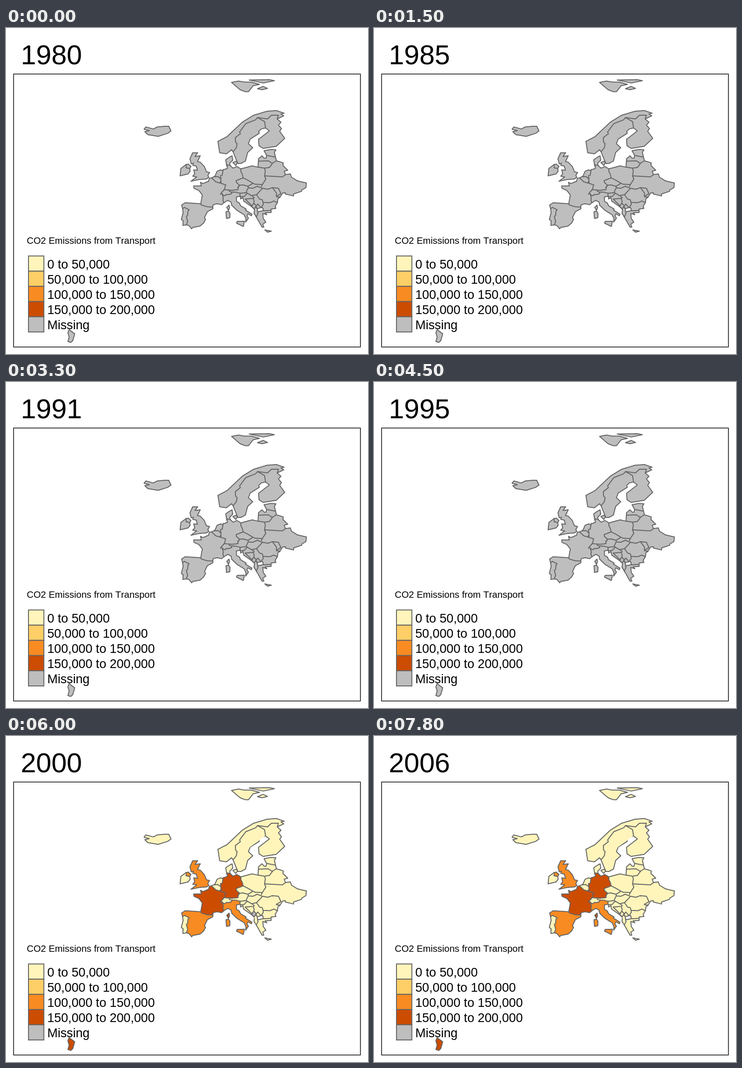
These frames come from a looping animation (789 px wide and 710 px high, 8 s). An HTML page:

```html
<!DOCTYPE html>
<html lang="en">
<head>
<meta charset="utf-8">
<title>CO2 Emissions from Transport</title>
<style>
html, body { margin: 0; width: 100%; height: 100%; overflow: hidden; background: #fff; }
svg { display: block; width: 100%; height: 100%; font-family: "Liberation Sans", Arial, sans-serif; font-kerning: none; }
#map * { fill: #bebebe; stroke: #636363; stroke-width: 2; stroke-linejoin: round; vector-effect: non-scaling-stroke; }
#map.data * { fill: #fff5bb; }
#map.data .high { fill: #f88b22; }
#map.data .top { fill: #cc4c02; }
#map.data .late { fill: #bebebe; }
#map.full .late { fill: #fff5bb; }
#map .hole { fill: #fff; }
#map polyline { fill: none; }
#key rect { stroke: #636363; stroke-width: 2; }
#key text { font-size: 27.2px; }
</style>
</head>
<body>
<svg viewBox="0 0 789 710">
<text id="year" x="32.2" y="79" font-size="60">1980</text>
<!-- longitude and latitude in tenths of a degree; later shapes cover shared borders -->
<g id="map" transform="matrix(.5496 0 0 -.73 434.4 699.5)">
<!-- eastern block, Low Countries, Jutland, southern block -->
<polygon points="130 530 141 538 186 547 209 543 211 568 225 577 233 570 241 570 243 578 233 592 259 596 280 595 274 587 282 562 309 556 308 548 327 534 313 531 318 521 337 523 342 513 366 502 401 496 399 482 383 475 382 471 350 463 350 457 317 463 317 467 307 466 296 453 240 460 140 475 125 480 115 500"/>
<polygon points="25 511 38 516 47 531 61 535 80 530 80 490 40 490"/>
<polygon points="99 546 85 546 81 565 94 572 106 577 109 564 97 555"/>
<polygon points="296 453 282 455 282 466 266 482 248 477 227 480 206 486 188 480 170 481 170 486 149 490 136 489 130 482 80 482 55 475 55 462 85 455 130 462 139 456 140 448 149 452 152 442 184 425 195 417 193 406 211 383 225 364 232 364 228 373 240 379 230 390 229 397 228 405 244 401 237 407 261 408 261 418 280 420 277 426 286 437 288 449"/>
<!-- France, Germany, Italy, Spain, Portugal -->
<polygon class="top" points="25 511 42 499 62 495 83 492 79 476 75 476 60 463 68 463 75 453 75 440 74 437 65 431 46 434 31 431 30 425 5 420 -19 430 -12 460 -25 473 -45 480 -46 487 -16 487 -19 498 -10 494 13 501 16 510"/>
<polygon class="top" points="85 550 99 548 110 540 125 545 141 538 141 530 147 521 150 511 122 503 124 497 136 489 129 483 130 476 105 474 75 476 81 490 62 495 62 508 60 518 67 519 71 536 79 537 88 540"/>
<polygon class="high" points="124 468 138 465 137 456 123 454 124 441 135 436 140 428 162 418 159 415 185 403 183 398 169 404 165 398 171 391 160 379 161 390 154 401 126 414 105 429 102 439 89 444 74 437 70 443 71 453 68 460 78 458 84 462 92 461 104 464 105 469"/>
<polygon class="high" points="-90 419 -94 430 -80 437 -19 434 -15 430 7 425 30 424 30 419 8 410 -3 393 1 387 -7 376 -21 367 -50 363 -54 359 -65 369 -75 371 -80 400"/>
<polygon points="-90 419 -83 423 -64 416 -69 411 -70 400 -75 396 -70 381 -75 371 -89 369 -88 383 -95 387 -88 408"/>
<!-- Nordic block, Svalbard, Iceland, Zealand -->
<polygon points="104 595 84 583 57 586 50 620 86 634 148 678 192 698 245 710 282 712 313 704 300 702 311 696 285 687 300 677 290 669 302 658 295 650 315 629 281 605 229 599 213 607 211 626 254 651 239 660 222 657 212 650 214 644 178 627 171 613 188 601 168 587 159 561 141 554 129 554 110 589"/>
<polygon points="215 790 190 786 171 768 159 768 138 774 104 796 132 800 155 797 182 797"/>
<polygon points="254 804 274 801 230 794 174 803"/>
<polygon points="247 778 225 774 207 777 229 784"/>
<polygon points="-145 665 -136 651 -149 644 -187 635 -228 640 -240 649 -222 652 -243 656 -236 663 -206 657 -191 663 -162 665"/>
<polygon points="127 556 121 548 109 557 124 561"/>
<!-- Ireland, United Kingdom -->
<polygon points="-62 539 -60 531 -68 523 -100 517 -97 539 -76 551"/>
<polygon class="high" points="-57 545 -62 539 -76 541 -76 551 -67 552"/>
<polygon class="high" points="-30 586 -41 575 -20 577 -31 560 -20 558 -4 545 5 529 17 527 10 518 14 513 5 508 -25 506 -57 501 -34 514 -50 516 -42 523 -46 535 -31 534 -36 546 -50 549 -47 555 -56 553 -61 568 -50 586"/>
<!-- Guiana, Corsica, Sardinia, Sicily, Crete -->
<polygon class="top" points="-526 25 -534 20 -545 23 -540 36 -545 49 -540 58 -518 46 -523 32"/>
<polygon class="top" points="96 422 92 414 85 423 94 430"/>
<polygon class="high" points="92 412 98 405 97 392 84 390 82 410"/>
<polygon class="high" points="155 382 151 366 124 376 126 381"/>
<polygon points="236 356 262 352 247 349"/>
<!-- borders -->
<polyline points="110 589 123 601 126 613 120 618 119 631 139 643 136 648 161 673 199 684 207 691 247 687 262 698 290 698 285 687"/>
<polyline points="207 691 235 679 239 660"/>
<polyline points="33 514 50 515 62 508"/>
<polyline points="57 495 61 501"/>
<polyline points="150 511 169 504 189 495 198 492 226 491 222 484"/>
<polyline points="226 491 240 507 235 517 238 531 235 540 209 543"/>
<polyline points="189 495 170 486"/>
<polyline points="235 517 306 514 318 521"/>
<polyline points="235 540 254 542 266 554 250 562 211 561"/>
<polyline points="266 555 282 562"/>
<polyline points="243 578 278 573"/>
<polyline points="266 482 290 480 300 464 282 456"/>
<polyline points="96 475 95 471 105 468"/>
<polyline points="138 465 161 467 170 481"/>
<polyline points="161 468 183 458 203 461 227 480"/>
<polyline points="203 461 215 448 226 446 229 438 256 437 272 442 286 437"/>
<polyline points="137 455 153 455 166 465"/>
<polyline points="186 427 158 448 190 450"/>
<polyline points="185 458 194 452 190 449 194 441 192 434"/>
<polyline points="229 438 230 432 224 426 226 423"/>
<polyline points="229 413 261 414"/>
<polyline points="202 394 209 405 206 419 198 427 194 419"/>
<polyline points="206 419 201 426 208 433 220 423"/>
<polygon class="hole" points="206 419 224 423 229 420 229 413 208 410"/>
<polygon class="late" points="194 419 185 425 188 432 193 435 202 428"/>
</g>
<rect x="16.5" y="100.3" width="756" height="594.4" fill="none" stroke="#000" stroke-width="1.5"/>
<text x="45.2" y="470" font-size="20.45">CO2 Emissions from Transport</text>
<g id="key"></g>
</svg>
<script>
const FRAME = 300, LOOP = 8000, FIRST = 1980, DATA = 2000, FULL = 2005;
const KEY = [
  ["#fff5bb", "0 to 50,000"],
  ["#fecf66", "50,000 to 100,000"],
  ["#f88b22", "100,000 to 150,000"],
  ["#cc4c02", "150,000 to 200,000"],
  ["#bebebe", "Missing"]
];
const byId = id => document.getElementById(id);
const year = byId("year"), map = byId("map");

byId("key").innerHTML = KEY.map(([fill, label], i) => {
  const y = 496.5 + i * 33.1;
  return `<rect x="49" y="${y}" width="33.5" height="33.1" fill="${fill}"/>
    <text x="90" y="${y + 27}">${label}</text>`;
}).join("");

let start;
function draw(now) {
  start ??= now;
  const y = FIRST + Math.floor(((now - start) % LOOP) / FRAME);
  year.textContent = y;
  map.classList.toggle("data", y >= DATA);
  map.classList.toggle("full", y >= FULL);
  requestAnimationFrame(draw);
}
requestAnimationFrame(draw);
</script>
</body>
</html>
```
